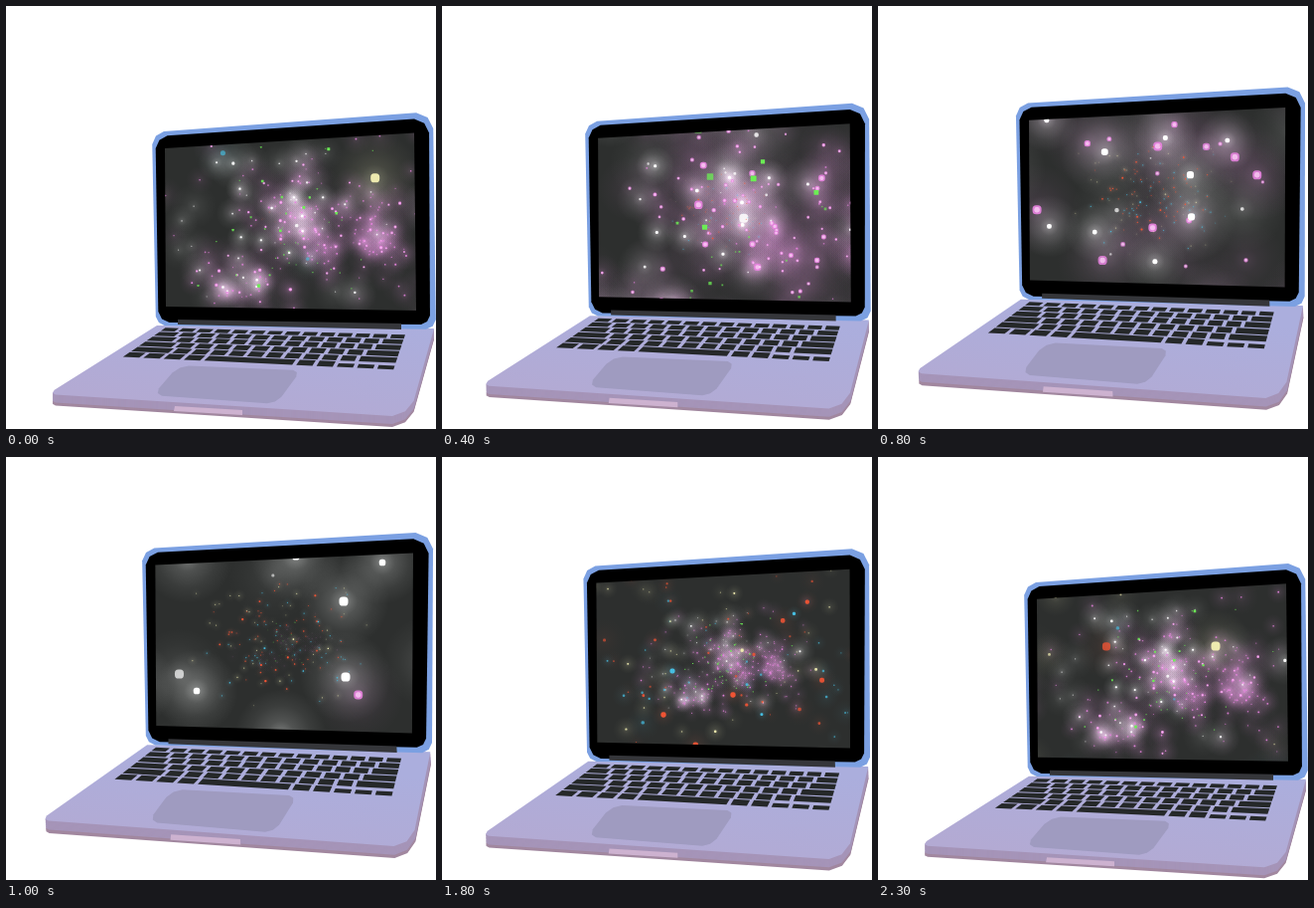
Write an HTML page with a canvas that moves like this. It is 433x425 px and loops after 2.4 s.

```html
<!DOCTYPE html>
<html lang="en">
<head>
<meta charset="utf-8">
<title>Laptop in space</title>
<style>
html, body { margin: 0; width: 100%; height: 100%; overflow: hidden; background: #fff; }
canvas { display: block; }
</style>
</head>
<body>
<canvas id="stage" width="433" height="425"></canvas>
<script>
const ctx = document.getElementById('stage').getContext('2d');
const STEPS = 24, STEP_MS = 100, DEG = Math.PI / 180;
const HINGE_Y = 320;

const lerp = (a, b, t) => a + (b - a) * t;
const mix = (p, q, t) => [lerp(p[0], q[0], t), lerp(p[1], q[1], t)];
const clamp = (v, lo, hi) => Math.min(hi, Math.max(lo, v));

// ---- Bobbing: the lid and the deck swing up and down, the front edge slightly ahead ----
function rise(y, step) {
  const lead = 5 + 9 * clamp((y - HINGE_Y) / 80, 0, 1);
  const c = a => Math.cos((a + lead) * DEG);
  return (c(0) - c(step * 15)) / (c(0) - c(150));
}
// Full travel of a point, blended between the lid top, the hinge and the front
const TRAVEL = {
  top: [[-10, -35], [0, -31]],
  hinge: [[-10, -32], [-4, -28]],
  front: [[-3, -21], [3, -20]]
};
function place([x, y], step) {
  const u = (x - 150) / 280;
  const row = name => mix(...TRAVEL[name], u);
  const [dx, dy] = y < HINGE_Y
    ? mix(row('top'), row('hinge'), (y - 110) / 210)
    : mix(row('hinge'), row('front'), (y - HINGE_Y) / 100);
  const k = rise(y, step);
  return [x + dx * k, y + dy * k];
}

// Cuts each corner of a quad with two short bevels
function bevel(quad, cuts) {
  return quad.flatMap((p, i) => {
    if (!cuts[i]) return [p];
    const toward = q => mix(p, q, cuts[i] / Math.hypot(q[0] - p[0], q[1] - p[1]));
    const a = toward(quad[(i + 3) % 4]), b = toward(quad[(i + 1) % 4]);
    return [a, mix(p, mix(a, b, 0.5), 0.65), b];
  });
}
function poly(points, fill) {
  ctx.beginPath();
  points.forEach(p => ctx.lineTo(p[0], p[1]));
  ctx.closePath();
  ctx.fillStyle = fill;
  ctx.fill();
}
const shape = (points, step, fill) => poly(points.map(p => place(p, step)), fill);

const SCREEN = [[160, 143], [411, 127.5], [413, 306], [161, 302]];
const LID = bevel([[147, 127], [430, 106], [433, 325], [151, 321]], [12, 17, 10, 9]);
const BEZEL = bevel([[150.5, 131], [426, 112.5], [427, 320], [153.5, 318]], [12, 15, 9, 11]);
const HINGE = [[173, 315], [398, 319], [398, 325], [173, 320]];
const DECK = bevel([[152, 321], [431, 324], [406, 413], [42, 390]], [0, 0, 17, 8]);
const PAD = bevel([[174, 361], [297, 366], [272, 400], [148, 391]], [10, 8, 9, 9]);
const NOTCH = [[170, 402], [238, 406], [238, 411], [169, 407]];
const KEYS = [[159, 323], [404, 330], [392, 366], [115, 353]];

// ---- Keyboard ----
function rowWidths(r) {
  if (r === 5) return Array.from({ length: 10 }, (_, i) => i === 4 ? 5 : 1.1);
  const edge = 1 + 0.3 * r;
  return [edge, ...Array(12 - Math.round(r / 2)).fill(1), edge];
}
const rowTop = r => Math.pow(r / 6, 1.12);

function keyboard(step) {
  const [a, b, c, d] = KEYS.map(p => place(p, step));
  const at = (u, v) => mix(mix(a, b, u), mix(d, c, u), v);
  for (let r = 0; r < 6; r++) {
    const widths = rowWidths(r);
    const total = widths.reduce((s, w) => s + w, 0);
    const bottom = rowTop(r + 1) - 0.018;
    let x = 0;
    widths.forEach((w, i) => {
      const top = rowTop(r) + (r === 5 && i > 6 ? 0.06 : 0.01);
      const u0 = (x + 0.11) / total, u1 = (x + w - 0.11) / total;
      poly([at(u0, top), at(u1, top), at(u1, bottom), at(u0, bottom)], '#252829');
      x += w;
    });
  }
}

// ---- Star field: the camera flies one depth unit per step ----
const KINDS = {
  white: { rgb: '255,255,255', size: 28, glow: 0.28, reach: 210 },
  pink: { rgb: '230,130,222', size: 24, glow: 0.17, reach: 150 },
  green: { rgb: '108,238,84', size: 18, glow: 0, reach: 0 },
  red: { rgb: '240,84,52', size: 23, glow: 0.14, reach: 60 },
  cyan: { rgb: '70,190,225', size: 22, glow: 0.16, reach: 60 },
  yellow: { rgb: '238,234,175', size: 22, glow: 0.2, reach: 100 }
};
const stars = [];
// Offsets from the screen middle as seen at a given step and depth
function addStar(kind, step, z, dx, dy, scale) {
  stars.push({ ...KINDS[kind], x: dx * z, y: dy * z, z: z + step, scale });
}
function middle(step) {
  const q = SCREEN.map(p => place(p, step));
  return [0, 1].map(i => q.reduce((s, p) => s + p[i], 0) / 4);
}

let seed = 71;
function rand() {
  seed = (seed * 16807) % 2147483647;
  return seed / 2147483647;
}
const spread = r => (rand() * 2 - 1) * r;
const bell = r => spread(r) + spread(r);

// Nebula: centre and half width of each clump
const CLUMPS = [[7, -24, 20, 32], [62, 22, 32, 20], [-47, 54, 28, 20], [85, 5, 22, 24], [0, 0, 85, 55], [0, -5, 95, 60]];
for (let i = 0; i < 230; i++) {
  const [cx, cy, rx, ry] = CLUMPS[i % CLUMPS.length];
  addStar(i % 10 ? 'pink' : 'white', 0, 6 + rand() * 6, cx + bell(rx), cy + bell(ry), 0.4 + rand() * 0.6);
}

// Loose layers: kind, count, step, nearest and farthest depth at that step
const LAYERS = [['white', 18, 0, 9, 13], ['green', 40, 0, 5, 9], ['red', 55, 14, 6, 12],
  ['cyan', 45, 14, 7, 13], ['yellow', 40, 14, 11, 15]];
for (const [kind, count, step, near, far] of LAYERS) {
  for (let i = 0; i < count; i++) {
    addStar(kind, step, lerp(near, far, rand()), bell(68), bell(48), 0.3 + rand() * rand() * 0.9);
  }
}

// The few stars that pass close by: kind, step, depth, place on the stage
const NEAR = [['white', 10, 2.5, 342, 221], ['white', 10, 2.5, 340, 145], ['white', 10, 5, 379, 106],
  ['white', 10, 5, 192, 235], ['white', 6, 8.7, 197, 141], ['white', 6, 8.7, 199, 223],
  ['white', 6, 8.5, 289, 155], ['white', 6, 8.5, 281, 250], ['green', 6, 2, 243, 226],
  ['green', 6, 1.5, 351, 116], ['yellow', 23, 2.7, 340, 190], ['cyan', 18, 5, 232, 215],
  ['red', 18, 5, 293, 239], ['red', 18, 5, 223, 259]];
for (const [kind, step, z, x, y] of NEAR) {
  const [mx, my] = middle(step);
  addStar(kind, step, z, x - mx, y - my, 1.15);
}

function halo({ s, z, x, y, fade }) {
  const r = Math.min(46, s.reach / z);
  const a = s.glow * fade * s.scale;
  const g = ctx.createRadialGradient(x, y, 0, x, y, r);
  [[0, 1], [0.3, 0.45], [0.65, 0.17], [1, 0]].forEach(([at, k]) =>
    g.addColorStop(at, `rgba(${s.rgb},${(a * k).toFixed(4)})`));
  ctx.fillStyle = g;
  ctx.fillRect(x - r, y - r, r * 2, r * 2);
}
function core({ s, z, x, y, fade }) {
  const d = clamp(s.size * s.scale / z, 1.2, 9);
  const dot = (size, fill) => {
    ctx.fillStyle = fill;
    ctx.beginPath();
    ctx.roundRect(x - size / 2, y - size / 2, size, size, size * (s.glow ? 0.4 : 0.1));
    ctx.fill();
  };
  dot(d, `rgba(${s.rgb},${fade * Math.min(1, 0.4 + s.scale * 0.6)})`);
  if (s.rgb === KINDS.pink.rgb && d > 2) dot(d * 0.6, `rgba(255,215,250,${fade * 0.7})`);
}
function drawStars(step) {
  const [mx, my] = middle(step);
  const seen = [];
  for (const s of stars) {
    const z = ((s.z - step) % STEPS + STEPS) % STEPS;
    const x = mx + s.x / z, y = my + s.y / z;
    if (z < 1.2 || Math.abs(x - mx) > 170 || Math.abs(y - my) > 140) continue;
    seen.push({ s, z, x, y, fade: Math.min(1, (STEPS - z) / 8) ** 2 });
  }
  ctx.globalCompositeOperation = 'lighter';
  seen.filter(p => p.s.glow).forEach(halo);
  ctx.globalCompositeOperation = 'source-over';
  seen.forEach(core);
}

// ---- Whole picture ----
function blend(x0, y0, x1, y1, from, to) {
  const g = ctx.createLinearGradient(x0, y0, x1, y1);
  g.addColorStop(0, from);
  g.addColorStop(1, to);
  return g;
}
function draw(step) {
  ctx.fillStyle = '#fff';
  ctx.fillRect(0, 0, 433, 425);
  for (let drop = 11; drop > 0; drop--) {
    shape(DECK.map(([x, y]) => [x, y + drop]), step, drop > 8 ? '#a1879f' : '#a594b8');
  }
  shape(DECK, step, blend(250, 300, 235, 410, '#abaedd', '#b3aad3'));
  shape(PAD, step, '#9f9bc0');
  shape(NOTCH, step, '#cdb2d0');
  keyboard(step);
  shape(LID, step, '#7ba0e2');
  shape(BEZEL, step, '#000');
  shape(HINGE, step, '#35363a');
  ctx.save();
  shape(SCREEN, step, '#2d2f2e');
  ctx.clip();
  drawStars(step);
  ctx.restore();
}

const start = performance.now();
let shown = -1;
function tick() {
  const step = Math.floor((performance.now() - start) / STEP_MS) % STEPS;
  if (step !== shown) draw(shown = step);
  requestAnimationFrame(tick);
}
tick();
</script>
</body>
</html>
```
